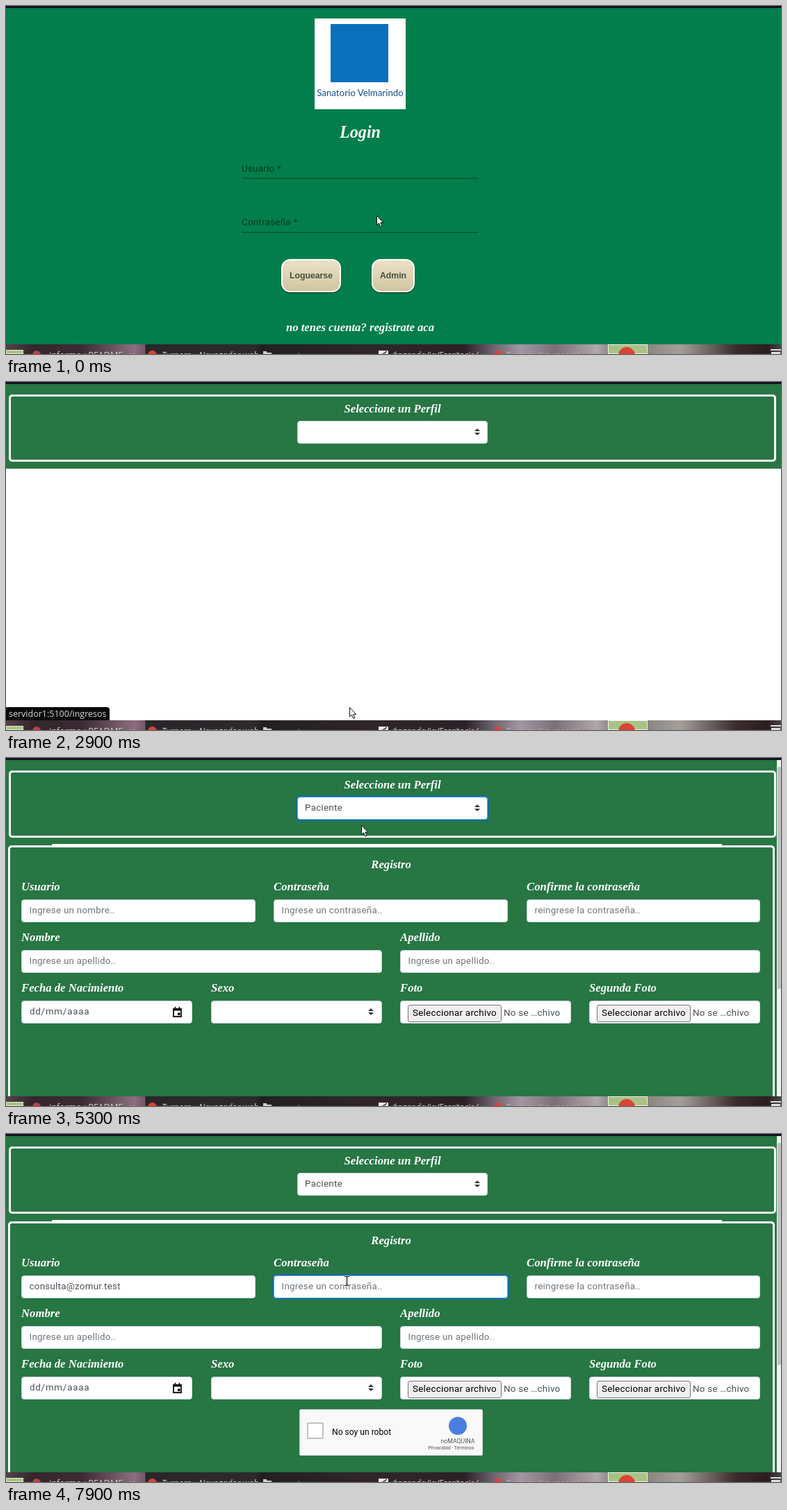
An HTML page that plays this animation: 1115 px wide and 502 px high, repeating every 8000 ms.

```html
<!DOCTYPE html>
<html lang="es">
<head>
<meta charset="utf-8">
<title>Registro</title>
<style>
  html, body { margin: 0; width: 100%; height: 100%; overflow: hidden; }
  #stage { position: relative; width: 1115px; height: 502px; overflow: hidden; background: #fff; }
  #stage div, #stage svg { position: absolute; box-sizing: border-box; }
  .view { inset: 0; }
  .text { white-space: pre; line-height: 20px; font: 13.4px/20px Roboto, sans-serif; letter-spacing: .25px; color: #495057; }
  .mid { transform: translateX(-50%); }
  .label { font: italic bold 16.7px/20px "Liberation Serif", serif; letter-spacing: 0; color: #fff; }
  .title { font-size: 24.2px; }
  .under { text-decoration: underline; text-decoration-thickness: 1px; text-underline-offset: 2px; }
  .hint { color: #6c757d; }
  .mat { color: rgba(0,0,0,.56); }
  .rule { height: 1px; background: rgba(0,0,0,.45); }
  .brand { font: 13.3px/20px Lato, sans-serif; letter-spacing: 0; color: #17508a; }
  .btn { border: 2px solid #fff; border-radius: 13px; background: linear-gradient(#ebe2c6, #cfc5a0); box-shadow: 0 1px 1px rgba(0,0,0,.75);
    font: bold 12.25px/44px "Liberation Sans", sans-serif; text-align: center; color: #414a33; text-shadow: 0 1px 0 rgba(255,255,255,.4); }
  .panel { border: 3px solid #fff; border-radius: 5px; }
  .green { background: #277644; }
  .field { background: #fff; border: 1px solid #ced4da; border-radius: 4px; }
  .ring { border: 1px solid #5fa6e6; border-radius: 4px; box-shadow: 0 0 0 2px rgba(0,104,205,.62); }
  .list { background: #fff; border: 1px solid #8a8f94; border-top: 0; box-shadow: 0 2px 5px rgba(0,0,0,.5); }
  .file { background: #efefef; border: 1px solid #767676; border-radius: 3px; }
  .black { color: #000; }
  .caret { width: 1px; height: 17px; background: #222; }
  .small { font-size: 8.7px; letter-spacing: 0; color: #555; }
  .tiny { font-size: 6.9px; letter-spacing: 0; color: #555; }
  .status { background: #0b0b0c; border-radius: 0 4px 0 0; }
  .ui { font: 12.5px/20px "Open Sans", sans-serif; letter-spacing: 0; color: #d6d6d6; }
  .it { font-style: italic; }
  .dot { border-radius: 50%; }
  .bar { overflow: hidden; background: linear-gradient(90deg, #57414a 0, #33262c 40px, #3d2b34 110px, #8d6e80 185px, #725767 200px,
    #29262a 201px, #2d2a2c 360px, #221f22 365px, #30262a 530px, #2b2026 660px, #6d6070 700px, #a197a2 740px, #7b6f79 790px, #b0a8aa 850px, #918b8c 866px,
    #8a8582 922px, #a59f9a 970px, #6e6663 1010px, #3c2c2c 1050px, #291d20 1095px, #4a4448 1115px); }
</style>
</head>
<body>
<div id="stage"></div>
<script>
const LOOP = 8000;
const stage = document.getElementById('stage');
const timed = [];
let root = stage;

// Everything is placed in stage pixels; a [from, to] span limits when it shows.
function add(cls, x, y, w, h, text = '', span) {
  const el = document.createElement('div');
  el.className = cls;
  el.style.left = x + 'px';
  el.style.top = y + 'px';
  if (w) el.style.width = w + 'px';
  if (h) el.style.height = h + 'px';
  el.textContent = text;
  root.append(el);
  if (span) timed.push({ el, span });
  return el;
}
const write = (x, y, text, cls = '', span) => add('text ' + cls, x, y - 10, 0, 0, text, span);
const center = (x, y, text, cls, span) => write(x, y, text, 'mid ' + cls, span);
function fill(x, y, w, h, color, cls = '', span) {
  const el = add(cls, x, y, w, h, '', span);
  el.style.background = color;
  return el;
}
function draw(x, y, w, h, shapes, span) {
  const box = add('', x, y, w, h, '', span);
  box.innerHTML = `<svg width="${w}" height="${h}" style="overflow:visible">${shapes}</svg>`;
  return box;
}
function group(span, build) {
  const parent = root;
  root = add('view', 0, 0, 0, 0, '', span);
  build();
  root = parent;
}
const spinner = (x, y) => draw(x - 4, y - 5, 8, 10, '<path d="M0 4L4 0 8 4ZM0 6L4 10 8 6Z" fill="#343a40"/>');

function loginView() {
  fill(0, 0, 1115, 488, '#017e4b');
  fill(444, 18, 131, 131, '#fff');
  fill(467, 26, 83, 84, '#0a70bc');
  center(509.5, 125, 'Sanatorio Velmarindo', 'brand');
  center(509.5, 181.5, 'Login', 'label title');
  write(339, 235, 'Usuario *', 'mat');
  add('rule', 339, 248, 341, 1);
  write(339, 312, 'Contraseña *', 'mat');
  add('rule', 339, 326, 341, 1);
  add('btn', 396, 365, 86, 48, 'Loguearse');
  add('btn', 526, 365, 62, 48, 'Admin');
  const link = 'no tenes cuenta? registrate aca';
  center(509.5, 464, link, 'label', [0, 2000]);
  center(509.5, 464, link, 'label under', [2000, 2900]);
}

function profilePicker() {
  add('green', 0, 3, 1115, 122);
  add('panel', 4, 18, 1104, 97);
  center(556, 39, 'Seleccione un Perfil', 'label');
  add('field', 419, 56, 274, 33);
  add('ring', 419, 56, 274, 33, '', [4000, 6700]);
  spinner(678, 72);
  write(430, 72, 'Paciente', '', [5300, LOOP]);
  group([4000, 5300], () => {
    add('list', 419, 88, 273, 38);
    fill(420, 89, 271, 17, '#0a7ffb', '', [4400, 5300]);
    write(431, 97, 'Paciente', '', [4000, 4400]);
    write(431, 97, 'Paciente', '', [4400, 5300]).style.color = '#fff';
    write(431, 114, 'Profesional');
  });
}

function input(x, y, w, label, hint = '', span) {
  write(x, y - 18, label, 'label');
  add('field', x, y, w, 33);
  if (hint) write(x + 11.5, y + 16, hint, 'hint', span);
}
function fileInput(x, label) {
  input(x, 350, 246, label);
  add('file', x + 11, 356, 135, 25);
  write(x + 18, 368, 'Seleccionar archivo', 'black');
  write(x + 149, 368, 'No se …chivo');
}

function captcha() {
  const box = fill(422, 397, 264, 67, '#f9f9f9');
  box.style.cssText += 'border:1px solid #d3d3d3;border-radius:2px';
  group([6000, LOOP], () => {
    fill(433, 416, 24, 24, '#fff').style.cssText += 'border:2px solid #c1c1c1;border-radius:2px';
    write(469, 430, 'No soy un robot', 'black').style.cssText += 'font-size:12.1px;letter-spacing:0';
    fill(637, 408, 26, 26, '#4a7fdf', 'dot');
    center(650, 442.5, 'noMAQUINA', 'small');
    center(640.5, 452.5, 'Privacidad - Términos', 'tiny');
  });
}

function form() {
  add('green', 0, 117, 1115, 371);
  fill(66, 124, 964, 2, '#fff');
  add('panel', 3, 125.5, 1103, 400);
  center(554, 154, 'Registro', 'label');
  input(22, 204, 337, 'Usuario', 'Ingrese un nombre..', [5300, 6700]);
  input(385, 204, 337, 'Contraseña', 'Ingrese un contraseña..');
  input(749, 204, 336, 'Confirme la contraseña', 'reingrese la contraseña..');
  input(22, 277, 519, 'Nombre', 'Ingrese un apellido..');
  input(567, 277, 518, 'Apellido', 'Ingrese un apellido..');
  input(22, 350, 246, 'Fecha de Nacimiento');
  write(34, 366, 'dd/mm/aaaa').style.letterSpacing = '.75px';
  draw(240, 359, 13, 15, '<path d="M1 3H12V14H1ZM1 4.5H12M3.5 0V3M9.5 0V3" fill="none" stroke="#111" stroke-width="1.8"/><path d="M7 8.5h3.5V12H7Z"/>');
  input(295, 350, 246, 'Sexo');
  spinner(525, 366);
  fileInput(567, 'Foto');
  fileInput(839, 'Segunda Foto');

  add('ring', 22, 204, 337, 33, '', [6700, 7500]);
  add('ring', 385, 204, 337, 33, '', [7500, LOOP]);
  write(33.5, 220, 'consulta@zomur.test', '', [6700, LOOP]);
  const wave = 'M0 1' + 'l2 2 2 -2'.repeat(17);
  draw(99, 225, 68, 4, `<path d="${wave}" fill="none" stroke="#e0242a" stroke-width="1"/>`, [6700, 7200]);
  add('caret', 34, 212, 0, 0, '', [6300, 6700]);
  add('caret', 167, 212, 0, 0, '', [6700, 7200]);
  add('caret', 397, 212, 0, 0, '', [7500, 7900]);
  group([5800, LOOP], captcha);

  fill(1109, 3, 6, 485, '#f1f1f1');
  fill(1110, 13, 5, 320, '#c1c1c1');
}

function taskbar() {
  const parent = root;
  root = add('bar', 0, 488, 1115, 14);
  fill(0, 8, 25, 6, '#a9c285').style.border = '1px solid #dfe8cf';
  fill(38, 9, 12, 12, '#b8414b', 'dot');
  write(62, 16, 'informe : README - v', 'ui');
  fill(204, 9, 13, 13, '#dc4437', 'dot');
  write(224, 16, 'Turnero - Navegador web', 'ui it');
  draw(370, 10, 12, 8, '<path d="M0 0H5L6 2H12V8H0Z" fill="#ccc"/>');
  write(387, 17, 'reportes', 'ui');
  draw(536, 9, 14, 8, '<path d="M0 0H14V8H0Z" fill="#e8e8e8"/><path d="M4 7L12 1" stroke="#555" stroke-width="2"/>');
  write(556, 16, '*agenda/ia/Escritorio/', 'ui it');
  fill(702, 9, 13, 13, '#dc4437', 'dot');
  write(719, 16, 'Turnero (en espera)', 'ui it').style.opacity = .6;
  fill(866, 0, 57, 14, '#a9c285').style.border = '1px solid #eef3e4';
  fill(881, 4, 24, 24, '#dc4437', 'dot');
  fill(1100, 7, 15, 2, '#ddd');
  fill(1101, 11, 13, 3, '#ddd');
  root = parent;
}

group([0, 2900], loginView);
group([2900, LOOP], profilePicker);
group([5300, LOOP], form);
fill(0, 0, 1115, 3, '#0f1322');
taskbar();
const status = add('status', 0, 469, 149, 19);
root = status;
write(4, 10, 'servidor1:5100/ingresos', 'ui');
root = stage;

const ink = 'fill="#fff" stroke="#111" stroke-width="1" stroke-linejoin="round"';
const pointers = {
  arrow: draw(0, 0, 11, 18, `<path d="M.5 .5V14L3.6 11.2 5.8 16.5 8 15.6 5.8 10.5H9.8Z" ${ink}/>`),
  hand: draw(-6, -1, 12, 13, `<path d="M4 .5Q5.5 .5 5.5 2V5L10 6Q11.5 6.5 11.3 8L10.4 12.5H4L.8 8.5Q.6 7 2.7 7.6V2Q2.7 .5 4 .5Z" ${ink}/>`),
  beam: draw(-4, -7, 8, 14, '<path d="M.5 .5H3L4 1.5 5 .5H7.5M4 1.5V12.5M.5 13.5H3L4 12.5 5 13.5H7.5" fill="none" stroke="#fff" stroke-width="2.4" opacity=".7"/><path d="M.5 .5H3L4 1.5 5 .5H7.5M4 1.5V12.5M.5 13.5H3L4 12.5 5 13.5H7.5" fill="none" stroke="#111" stroke-width="1.2"/>')
};

// [time, x, y]; the pointer advances in 100 ms steps between these points.
const path = [
  [0, 533, 302], [100, 535, 302], [200, 535, 301.5], [300, 535, 301.5], [400, 535, 301], [600, 535, 301],
  [800, 560, 276], [1100, 614, 231], [1300, 570, 270], [1500, 512, 304], [1600, 503, 335],
  [1900, 495, 440], [2000, 495, 468], [2100, 495, 470], [2800, 495, 470], [2900, 494, 469], [3200, 494, 469],
  [3500, 508, 290], [3800, 523, 81], [4000, 522, 83], [4200, 518, 88], [4300, 518, 88], [4500, 511, 96.5],
  [5500, 511, 96.5], [5600, 307, 213], [5700, 307, 213], [5800, 288, 208], [5900, 288, 208],
  [6000, 275, 214], [6900, 275, 214], [7000, 457, 214], [7100, 457, 214], [7300, 490.5, 212]
];
const kinds = [[0, 'arrow'], [2000, 'hand'], [2900, 'arrow'], [5600, 'beam'], [6300, ''], [6700, 'arrow'], [7000, 'beam']];

function pointerAt(t) {
  const i = path.findLastIndex(p => p[0] <= t);
  const [t0, x0, y0] = path[i];
  const [t1, x1, y1] = path[i + 1] || [LOOP, x0, y0];
  const k = (t - t0) / (t1 - t0);
  return [x0 + (x1 - x0) * k, y0 + (y1 - y0) * k];
}

function render(now) {
  const t = Math.floor(now % LOOP / 100) * 100;
  for (const { el, span } of timed) el.style.display = t >= span[0] && t < span[1] ? '' : 'none';
  status.style.opacity = t < 2300 || t >= 3400 ? 0 : t === 2300 || t === 3300 ? .5 : 1;
  const [x, y] = pointerAt(t);
  const kind = kinds.findLast(k => k[0] <= t)[1];
  for (const name in pointers) {
    const style = pointers[name].style;
    style.display = name === kind ? '' : 'none';
    style.transform = `translate(${x}px, ${y}px)`;
  }
}

const start = performance.now();
function tick() {
  render(performance.now() - start);
  requestAnimationFrame(tick);
}
tick();
</script>
</body>
</html>
```
